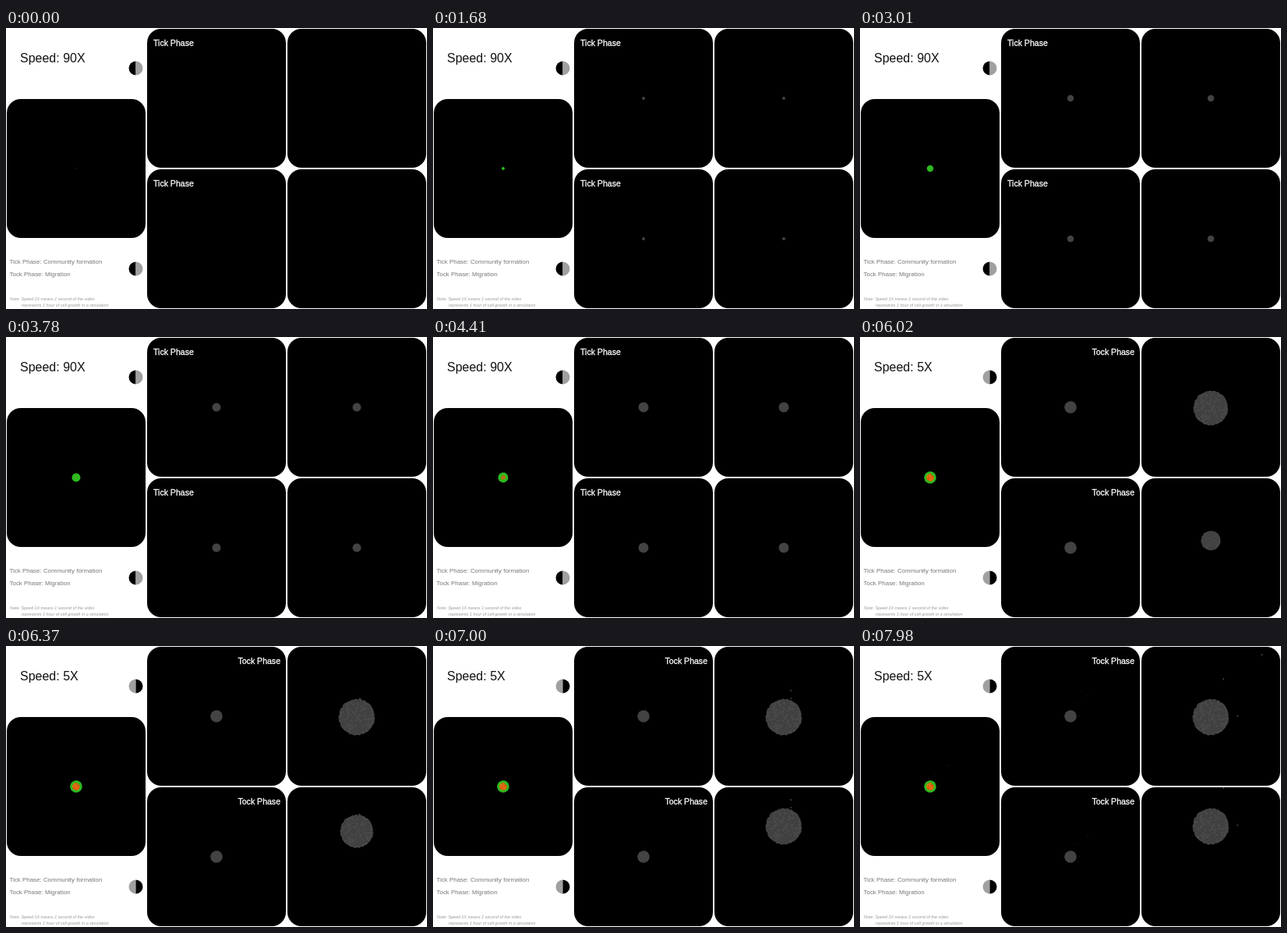
An HTML page with a canvas for the animation above (8 s loop, 540x360 px).

```html
<!DOCTYPE html>
<html>
<head>
<meta charset="utf-8">
<title>Cell growth phases</title>
<style>
  html, body { margin: 0; width: 100%; height: 100%; overflow: hidden; background: #fff; }
  canvas { display: block; }
</style>
</head>
<body>
<canvas id="stage" width="540" height="360"></canvas>
<script>
const ctx = document.getElementById('stage').getContext('2d');
const LOOP = 8000, STEP = 70, TOCK_START = 5310;
const FONT = '"Liberation Sans", Arial, sans-serif';
const GRAY = '#444', GREEN = '#2cbb1f';
const PANELS = [[1, 91], [181, 1], [361, 1], [181, 181], [361, 181]];

// Keys are [time, value, ...values]
const RADIUS = [[0, .4], [980, 1.2], [1750, 2], [3010, 4.2], [4410, 6.4], [5250, 7.7]];
const MIGRANTS = [
  [[6300, 1, -7], [6790, 3, -13.3], [7000, 3, -11.3], [7630, 14, -15.5], [7980, 21.8, -26.6]],
  [[6600, 2, -7], [7000, 3, -8], [7980, 5.4, -16.3]],
  [[7200, 8, -1], [7560, 14, -2], [7980, 11.4, -.5]]
];

function seeded(seed) {
  return () => (seed = (seed * 16807) % 2147483647) / 2147483647;
}
const random = seeded(4127);
const edge = Array.from({ length: 72 }, () => .96 + random() * .07);
const grains = Array.from({ length: 150 }, (_, i) => {
  const angle = i * 2.39996, distance = Math.sqrt((i + .5) / 150) * .95;
  return { x: Math.cos(angle) * distance, y: Math.sin(angle) * distance, distance, tone: random() };
});

const progress = (t, start, end) => Math.min(1, Math.max(0, (t - start) / (end - start)));

function sample(keys, t) {
  let i = 0;
  while (i < keys.length - 2 && t >= keys[i + 1][0]) i++;
  const a = keys[i], b = keys[i + 1], p = progress(t, a[0], b[0]);
  return a.slice(1).map((v, k) => v + (b[k + 1] - v) * p);
}

function text(string, x, y, size, color, style = '', align = 'left') {
  ctx.font = `${style} ${size}px ${FONT}`;
  ctx.textAlign = align;
  ctx.fillStyle = color;
  ctx.fillText(string, x, y);
}

function label(string, x, y, align) {
  text(string, x, y, 10.55, '#fff', '', align);
  ctx.strokeStyle = '#fff';
  ctx.lineWidth = .3;
  ctx.strokeText(string, x, y);
}

function disc(x, y, r, color) {
  ctx.fillStyle = color;
  ctx.beginPath();
  ctx.arc(x, y, r, 0, Math.PI * 2);
  ctx.fill();
}

function phaseIcon(x, y, tock) {
  [['#000', '#a0a0a0'][+tock], ['#a0a0a0', '#000'][+tock]].forEach((color, side) => {
    ctx.fillStyle = color;
    ctx.beginPath();
    ctx.arc(x, y, 9, Math.PI * (.5 + side), Math.PI * (1.5 + side));
    ctx.fill();
  });
}

function blob(x, y, r, color) {
  ctx.fillStyle = color;
  ctx.beginPath();
  edge.forEach((k, i) => {
    const angle = i / edge.length * Math.PI * 2;
    ctx.lineTo(x + Math.cos(angle) * r * k, y + Math.sin(angle) * r * k);
  });
  ctx.fill();
}

function grayColony(x, y, r) {
  blob(x, y, r, GRAY);
  for (const g of grains) {
    const color = g.tone < .5 ? 'rgba(0,0,0,.12)' : 'rgba(255,255,255,.04)';
    disc(x + g.x * r, y + g.y * r, r * .05, color);
  }
}

function greenColony(x, y, r, t) {
  blob(x, y, r, GREEN);
  const core = .6 * progress(t, 3200, 4900);
  const density = .3 + .6 * progress(t, 4000, 5250);
  for (const g of grains) {
    if (g.distance < core && g.tone < density) {
      disc(x + g.x * r, y + g.y * r, r * .1, g.tone < .6 ? '#f4500f' : '#e8801a');
    }
  }
}

function migrants(x, y, zoom, t, color) {
  const size = .5 * Math.sqrt(zoom);
  ctx.globalAlpha = zoom > 2 ? .9 : .45;
  for (const path of MIGRANTS) {
    if (t < path[0][0]) continue;
    const [dx, dy] = sample(path, t);
    disc(x + dx * zoom, y + dy * zoom, size, color);
  }
  ctx.globalAlpha = 1;
}

function inPanel([x, y], paint) {
  ctx.save();
  ctx.beginPath();
  ctx.roundRect(x, y, 178, 178, 18);
  ctx.fillStyle = '#000';
  ctx.fill();
  ctx.clip();
  paint();
  ctx.restore();
}

function draw(t) {
  const tock = t >= TOCK_START;
  const [r] = sample(RADIUS, t);
  const zoomTop = 3 ** progress(t, TOCK_START, 6050);
  const pan = progress(t, 5700, 6430);
  const zoomBottom = 3 ** pan;
  const views = [
    [90, 180, 1], [270, 90, 1], [450, 90 + (zoomTop - 1) / 2, zoomTop],
    [270, 270, 1], [450, 270 - 13 * pan * zoomBottom, zoomBottom]
  ];

  ctx.fillStyle = '#fff';
  ctx.fillRect(0, 0, 540, 360);

  views.forEach(([x, y, zoom], i) => inPanel(PANELS[i], () => {
    if (i === 0) greenColony(x, y, r, t);
    else if (t >= 980) grayColony(x, y, r * zoom);
    migrants(x, y, zoom, t, i ? '#666' : GREEN);
  }));

  for (const y of [23, 203]) {
    if (tock) label('Tock Phase', 352, y, 'right');
    else label('Tick Phase', 189, y, 'left');
  }
  phaseIcon(166.5, 51.5, tock);
  phaseIcon(166.5, 308.5, tock);

  text(tock ? 'Speed: 5X' : 'Speed: 90X', 18, 44, 16, '#111');
  text('Tick Phase: Community formation', 4.5, 302, 7.95, '#777');
  text('Tock Phase: Migration', 4.5, 318, 7.95, '#777');
  text('Note: Speed 1X means 1 second of the video', 5, 349, 5.4, '#999', 'italic');
  text('represents 1 hour of cell growth in a simulation', 20, 356.5, 5.4, '#999', 'italic');
}

const start = performance.now();
function tick() {
  const t = (performance.now() - start) % LOOP;
  draw(Math.floor(t / STEP) * STEP);
  requestAnimationFrame(tick);
}
tick();
</script>
</body>
</html>
```
